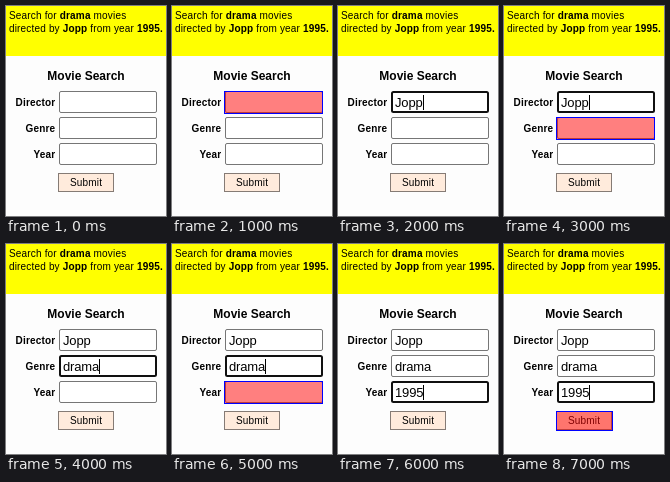
These frames come from a looping animation (160 by 210 pixels, 8 s). An HTML page:

```html
<!DOCTYPE html>
<html lang="en">
<head>
<meta charset="utf-8">
<title>Movie Search</title>
<style>
  html, body { margin: 0; width: 160px; height: 210px; overflow: hidden; background: #fdfdfd; }
  svg { display: block; font: 10px Arial, "Liberation Sans", sans-serif; letter-spacing: .17px; white-space: pre; }
  .bold, tspan { font-weight: bold; }
  .title { font-size: 12px; letter-spacing: 0; text-anchor: middle; }
  .label { text-anchor: end; }
  .value { font-size: 13px; letter-spacing: -.15px; }
  .field { fill: #fff; stroke: #767676; }
  .field.focus { stroke: #101010; stroke-width: 2; }
  .button { fill: #ffebdc; stroke: #857b75; }
  .target { fill: #f00; fill-opacity: .5; stroke: #00f; }
</style>
</head>
<body>
<svg width="160" height="210" viewBox="0 0 160 210">
  <rect width="160" height="50" fill="#ff0"/>
  <text x="3" y="13">Search for <tspan>drama</tspan> movies</text>
  <text x="3" y="26">directed by <tspan>Jopp</tspan> from year <tspan>1995.</tspan></text>
  <text class="bold title" x="80" y="74">Movie Search</text>
  <g id="form"></g>
</svg>
<script>
const STEP = 1000, STEPS = 8;
const form = document.getElementById('form');
const fields = [['Director', 'Jopp'], ['Genre', 'drama'], ['Year', '1995']];

// Outer box, with the stroke kept inside it.
const box = (cls, x, y, w, h, line = 1, radius = 0) =>
  `<rect class="${cls}" x="${x + line / 2}" y="${y + line / 2}" width="${w - line}" height="${h - line}" rx="${radius}"/>`;
const text = (cls, x, y, content) => `<text class="${cls}" x="${x}" y="${y}">${content}</text>`;

// Each field is highlighted for one step, then filled and focused for the next two.
function drawField([label, value], index, step) {
  const y = 85 + index * 26;
  const age = step - 1 - index * 2;
  const focused = age === 1 || age === 2;
  let out = text('bold label', 49.3, y + 15, label);
  out += box(focused ? 'field focus' : 'field', 53, y, 98, 22, focused ? 2 : 1, 1.5);
  if (age > 0) out += text('value', 57, y + 16, value);
  if (age === 0) out += box('target', 52, y, 99, 23);
  return out;
}

function draw(step) {
  let out = fields.map((field, i) => drawField(field, i, step)).join('');
  out += box('button', 52, 167, 56, 19) + text('', 64, 180, 'Submit');
  if (step === STEPS - 1) out += box('target', 52, 167, 57, 20);
  form.innerHTML = out;

  const active = Math.floor(step / 2) - 1;
  if (active < 0) return;
  const typed = form.querySelectorAll('.value')[active];
  const caretX = Math.round(57 + typed.getComputedTextLength());
  form.innerHTML += `<rect x="${caretX}" y="${89 + active * 26}" width="1" height="15"/>`;
}

let shown = -1;
function tick() {
  const step = Math.floor(performance.now() / STEP) % STEPS;
  if (step !== shown) draw(shown = step);
  requestAnimationFrame(tick);
}
tick();
</script>
</body>
</html>
```
